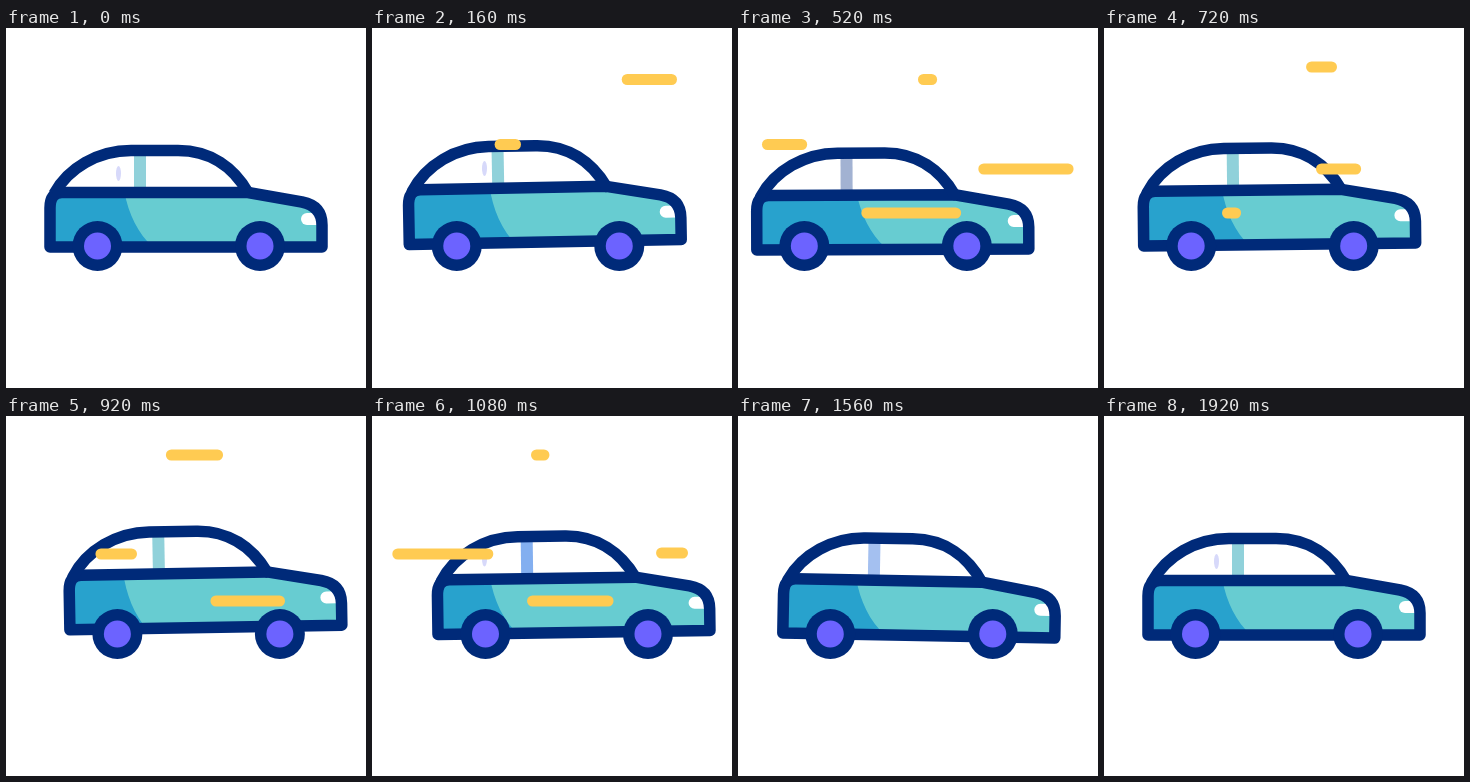
Animation of 360 by 360 pixels, one loop 2 s. Source, as an HTML page with a canvas:

```html
<!DOCTYPE html>
<html lang="en">
<head>
<meta charset="utf-8">
<title>Car</title>
<style>
html, body { margin: 0; width: 100%; height: 100%; overflow: hidden; background: #fff; }
canvas { display: block; }
</style>
</head>
<body>
<canvas id="stage" width="360" height="360"></canvas>
<script>
const ctx = document.getElementById('stage').getContext('2d');
const NAVY = '#002a79', TEAL = '#67ccd1', BLUE = '#28a2cd', VIOLET = '#6c63ff', YELLOW = '#ffcb52';
const LOOP = 2000, STEP = 40, LAST = 1920;

// Keyframes as [time, value], eased in and out between neighbours
const shiftKeys = [[0, 0], [480, -26], [1000, 23], [1630, 0]];
const liftKeys = [[0, 0], [320, -10], [520, 2.5], [920, -7.5], [1240, 2.5], [1560, 0.5], [1720, 0]];
const tiltKeys = [[0, 0], [320, -2.1], [520, -0.2], [920, -1], [1240, -0.6], [1560, 1.05], [1720, 0]];
const pillarTints = [[0, '#90d1da'], [200, '#9db6ee'], [440, '#a2b2d2'], [700, '#90d1da'],
  [1080, '#83aff0'], [1400, '#a4c0f0'], [1720, '#90d1da']];

// Speed lines: start time, y, right end, length
const lines = [
  [7, 51.5, 299.5, 114], [77, 116.5, 143.5, 114], [207, 185, 237.5, 114], [277, 141, 331.5, 114],
  [585, 39, 227.5, 63], [725, 185, 273.5, 113], [797, 138, 125.5, 113], [981, 137, 310.5, 113]
];

const body = new Path2D('M44 219V180Q44 164.5 56 164.5H242L296 174Q316 178 316 197V219Z');
const roof = new Path2D('M48 166C62 140 92 122.5 125 122.5H172C205 122.5 228 140 242 164.5');
const lamp = new Path2D('M311 185H301A6 6 0 0 0 301 197H311Z');
const shade = new Path2D('M0 100H113L117 155C120 180 130 204 147 219L160 240H0Z');

const ease = p => {
  p = Math.min(1, Math.max(0, p));
  return p * p * (3 - 2 * p);
};

function tween(keys, t) {
  let value = keys[0][1];
  for (let i = 1; i < keys.length; i++) {
    const [t0, v0] = keys[i - 1], [t1, v1] = keys[i];
    if (t >= t0) value = v0 + (v1 - v0) * ease((t - t0) / (t1 - t0));
  }
  return value;
}

function fill(color, path) {
  ctx.fillStyle = color;
  ctx.fill(path);
}

function disc(x, y, rx, ry, color) {
  const path = new Path2D();
  path.ellipse(x, y, rx, ry, 0, 0, 7);
  fill(color, path);
}

function drawBody(t, shift) {
  const pose = new DOMMatrix().translate(180 + shift, 219 + tween(liftKeys, t))
    .rotate(tween(tiltKeys, t)).translate(-180, -219);
  const tint = pillarTints.findLast(([from]) => t >= from)[1];

  ctx.save();
  ctx.setTransform(pose);
  fill('#fff', roof);
  ctx.fillStyle = tint;
  ctx.fillRect(128, 125, 12, 38);
  fill(TEAL, body);
  ctx.restore();

  // The shaded rear keeps its place on the stage while the body slides over it
  ctx.save();
  const mask = new Path2D();
  mask.addPath(body, pose);
  ctx.clip(mask);
  fill(BLUE, shade);
  ctx.restore();
  if (t < 200 || (t >= 1080 && t < 1400) || t >= 1720) {
    disc(112.5, 145.5 + tween(liftKeys, t), 2.5, 7.5, '#d7d9fa');
  }

  ctx.save();
  ctx.setTransform(pose);
  fill('#fff', lamp);
  ctx.strokeStyle = NAVY;
  ctx.lineWidth = 11.5;
  ctx.lineJoin = 'round';
  ctx.stroke(body);
  ctx.stroke(roof);
  ctx.restore();
}

function drawLine(age, y, right, length) {
  const head = ease(age / 360), tail = ease((age - 220) / 350);
  if (head <= 0 || tail >= 1) return;
  ctx.beginPath();
  ctx.moveTo(right - length * tail, y);
  ctx.lineTo(right - length * head, y);
  ctx.strokeStyle = YELLOW;
  ctx.lineWidth = 11;
  ctx.lineCap = 'round';
  ctx.stroke();
}

function draw(now) {
  const t = Math.min(LAST, Math.floor(now % LOOP / STEP) * STEP);
  const shift = tween(shiftKeys, t);
  ctx.fillStyle = '#fff';
  ctx.fillRect(0, 0, 360, 360);
  drawBody(t, shift);
  for (const x of [91.5, 254]) {
    disc(x + shift, 218, 25, 25, NAVY);
    disc(x + shift, 218, 13.5, 13.5, VIOLET);
  }
  for (const [start, ...line] of lines) drawLine(t - start, ...line);
}

const begin = performance.now();
function tick() {
  draw(performance.now() - begin);
  requestAnimationFrame(tick);
}
tick();
</script>
</body>
</html>
```
